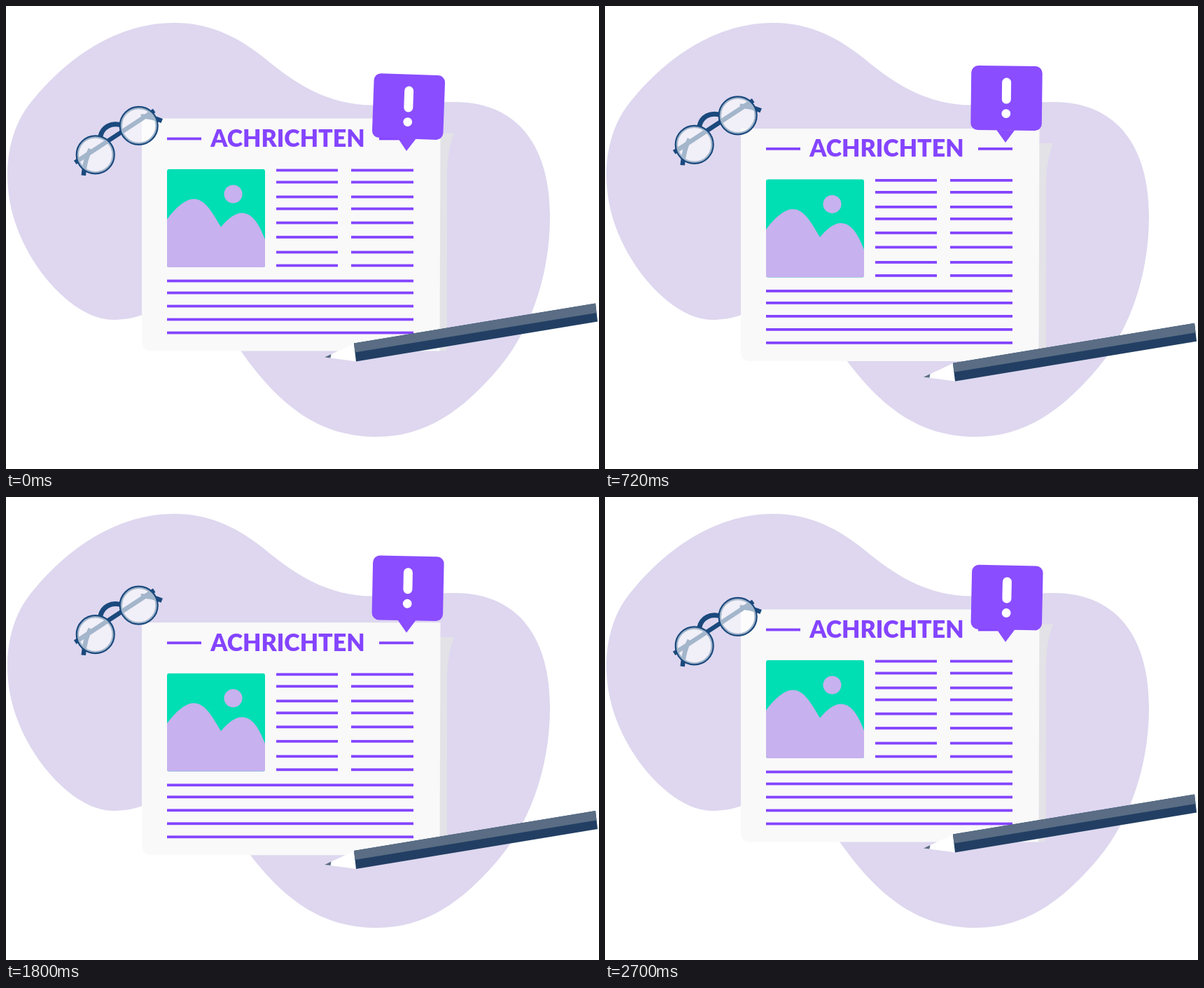
Write an HTML page with a canvas that moves like this. It is 847 px wide and 661 px high and loops after 2.76 s.

```html
<!DOCTYPE html>
<html lang="de">
<head>
<meta charset="utf-8">
<title>Achrichten</title>
<style>
  html, body { margin: 0; width: 100%; height: 100%; overflow: hidden; background: #fff; }
  canvas { display: block; }
</style>
</head>
<body>
<canvas id="stage" width="847" height="661"></canvas>
<script>
const ctx = document.getElementById('stage').getContext('2d');
const LOOP = 2760, STEP = 60;
const VIOLET = '#8444ff', BUBBLE = '#8a4dff', NAVY = '#1a497d', SLATE = '#5a6d84';

const blob = new Path2D('M2 240C2 205 12 170 30 145C75 85 150 24 240 24C295 24 335 47 370 75' +
  'C412 110 460 142 525 141.5C565 141 600 137 640 137C735 137 777 205 777 300' +
  'C777 390 746 471 697 525C651 577 600 615 530 615C460 615 400 585 335 492' +
  'C300 450 240 430 195 441C180 446 167 448 153 448C110 448 65 405 40 365C15 325 2 285 2 240Z');
const backPage = new Path2D('M615 181H640C633 200 630 215 630 250V487Q630 492 625 492H615Z');
const page = new Path2D('M194 160H620.5L619.5 492H208Q194 492 194 478Z');
const hills = new Path2D('M230 304C243 287 256 275 268 275C284 275 294 293 307 315' +
  'C317 303 327 295 337 295C351 295 361 309 370 333V373H230Z');
const glassArms = new Path2D('M99 223L212 149M193 157Q207 157 223 163.5M121 204Q113 218 111 241.5');
const bridge = new Path2D('M135 186C138 172 151 165 166 170');

// Keys are [time, value] pairs joined by cosine easing.
function ease(keys, t) {
  for (let i = 1; i < keys.length; i++) {
    const [t0, v0] = keys[i - 1], [t1, v1] = keys[i];
    if (t <= t1) return v0 + (v1 - v0) * (1 - Math.cos(Math.PI * (t - t0) / (t1 - t0))) / 2;
  }
  return keys[keys.length - 1][1];
}

const pageDrop = [[0, 0.5], [1330, 26], [2700, 0.5]];
const lift = [[0, 0], [1190, 1], [1330, 1], [2700, 0]];
const pencilDrop = [[0, 0.5], [630, 30], [1280, 2], [2030, 30], [2700, 0.5]];
const bubbleTilt = [[-60, 1.2], [240, 10], [480, -9], [760, 1.2]];

function fill(path, color) {
  ctx.fillStyle = color;
  ctx.fill(path);
}

function stroke(path, color, width) {
  ctx.strokeStyle = color;
  ctx.lineWidth = width;
  ctx.stroke(path);
}

function polygon(color, ...points) {
  fill(new Path2D('M' + points.join('L') + 'Z'), color);
}

function circle(x, y, r) {
  const path = new Path2D();
  path.arc(x, y, r, 0, 2 * Math.PI);
  return path;
}

function rounded(x, y, w, h, r) {
  const path = new Path2D();
  path.roundRect(x, y, w, h, r);
  return path;
}

function moved(x, y, draw, degrees = 0) {
  ctx.save();
  ctx.translate(x, y);
  ctx.rotate(degrees * Math.PI / 180);
  draw();
  ctx.restore();
}

function rule(x0, x1, y) {
  ctx.fillStyle = VIOLET;
  ctx.fillRect(x0, y - 1.9, x1 - x0, 3.8);
}

function drawPicture() {
  ctx.save();
  ctx.clip(rounded(230, 232.5, 140, 140, 3));
  ctx.fillStyle = '#00deb4';
  ctx.fillRect(230, 232, 140, 141);
  fill(hills, '#c7b1ee');
  fill(circle(324.5, 268, 13), '#c7b1ee');
  ctx.restore();
}

function drawPaper() {
  fill(backPage, '#e3e2e7');
  fill(page, '#f9f9f9');
  ctx.fillStyle = VIOLET;
  ctx.font = '900 34px Lato, sans-serif';
  ctx.textAlign = 'center';
  ctx.fillText('ACHRICHTEN', 402.5, 200.5);
  rule(230, 279, 189);
  rule(533, 582, 189);
  drawPicture();
  for (const y of [234, 251, 272, 289, 309, 329.5, 351, 370]) {
    rule(386, 474, y);
    rule(493, 582, y);
  }
  for (const y of [392, 409, 428, 447, 466]) rule(230, 582, y);
}

function drawGlasses() {
  stroke(glassArms, NAVY, 6.5);
  stroke(bridge, NAVY, 7);
  for (const [x, y] of [[128, 212], [190, 170.5]]) {
    fill(circle(x, y, 27), 'rgba(255,255,255,.6)');
    stroke(circle(x, y, 25), '#a3b6cb', 2.5);
    stroke(circle(x, y, 27), NAVY, 2.2);
  }
}

// The origin is the point of the speech bubble's tail.
function drawBubble() {
  fill(rounded(-50, -109.5, 101.5, 92, 10), BUBBLE);
  polygon(BUBBLE, [-13, -18], [13, -18], [0, 0]);
  fill(rounded(-5.9, -92.5, 13, 37, 6.5), '#fff');
  fill(circle(0.3, -41.5, 6.4), '#fff');
}

function drawPencil() {
  polygon('#fff', [455, 501], [498, 481], [501, 507]);
  polygon(SLATE, [455, 501], [464.5, 496.6], [463.5, 502]);
  polygon('#223f63', [497, 481], [842, 424], [845, 450], [500, 507]);
  polygon(SLATE, [497, 481], [842, 424], [843.5, 437.5], [498.5, 494]);
}

function draw(t) {
  ctx.fillStyle = '#fff';
  ctx.fillRect(0, 0, 847, 661);
  fill(blob, '#ded7ef');
  const rise = ease(lift, t);
  moved(0, ease(pageDrop, t), drawPaper);
  moved(-0.3, 0.4 - 22 * rise, drawGlasses);
  const tilt = ease(bubbleTilt, t >= LOOP - STEP ? t - LOOP : t);
  moved(572, 207 - 18 * rise, drawBubble, tilt);
  moved(0, ease(pencilDrop, t), drawPencil);
}

const start = performance.now();
function tick() {
  const elapsed = (performance.now() - start) % LOOP;
  draw(Math.floor(elapsed / STEP) * STEP);
  requestAnimationFrame(tick);
}
tick();
</script>
</body>
</html>
```
